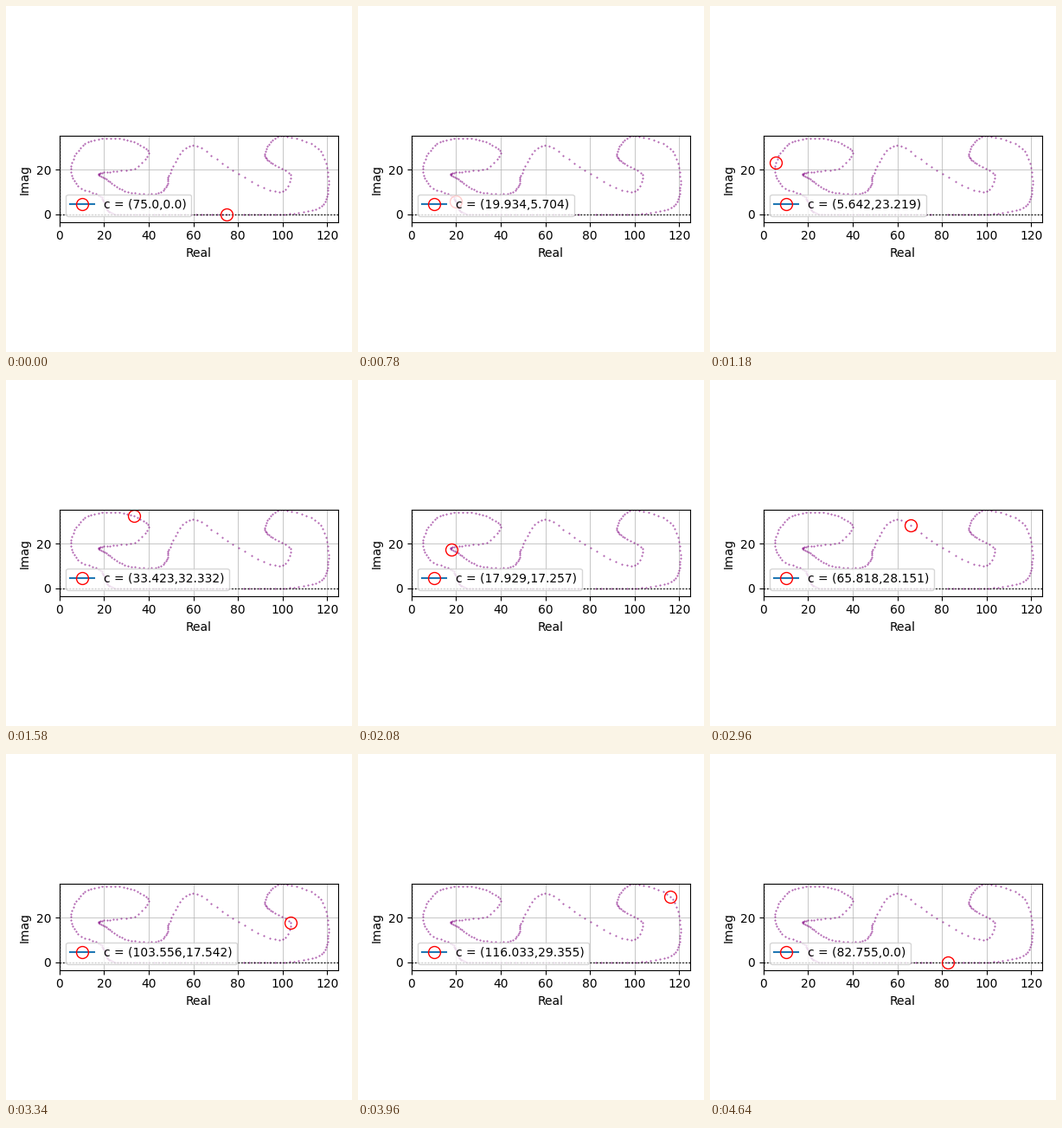
A matplotlib script that plays this animation: 400 px wide and 400 px high, repeating every 4.66 s.

```python
import numpy as np
import matplotlib.pyplot as plt
from matplotlib.animation import FuncAnimation

SIZE = 400
STEPS = 233

# Key points of the curve in the complex plane, by time step
KEYS = {
    0: 75, 24: 25, 39: 19.934 + 5.704j, 45: 17.7 + 8.5j,
    51: 8.4 + 12.6j, 54: 5.8 + 16.2j, 66: 11.5 + 31.6j,
    79: 33.423 + 32.332j, 85: 39.9 + 27.3j, 90: 33.7 + 20.5j,
    95: 24 + 19.2j, 102: 17.5 + 17.9j, 108: 20.9 + 15.6j,
    117: 30.6 + 10j, 126: 45.6 + 9.9j, 130: 48.194 + 13.167j,
    135: 49 + 17.4j, 146: 61.7 + 30.5j, 152: 75.2 + 21.1j,
    162: 100 + 10.3j, 167: 103.556 + 17.542j, 172: 96.7 + 22j,
    178: 92.2 + 25.5j, 190: 100.6 + 35j, 198: 116.033 + 29.355j,
    208: 120.4 + 11.9j, 216: 116.3 + 2.95j, 222: 105.2 + 0.3j,
    232: 82.755,
}


def spline(t, keys):
    """Cubic Hermite curve through the keys, slopes from their neighbours."""
    knots = np.array(list(keys), float)
    c = np.array(list(keys.values()), complex)
    i = np.clip(np.searchsorted(knots, t, side="right") - 1, 0, len(c) - 2)
    h = np.diff(knots)[i]
    u = (t - knots[i]) / h
    slope = np.gradient(c.real, knots) + 1j * np.gradient(c.imag, knots)
    return ((1 + 2 * u) * (1 - u) ** 2 * c[i]
            + u * (1 - u) ** 2 * h * slope[i]
            + u ** 2 * (3 - 2 * u) * c[i + 1]
            + u ** 2 * (u - 1) * h * slope[i + 1])


curve = spline(np.arange(STEPS), KEYS)
real = curve.real
imag = np.maximum(curve.imag, 0)


def label(i):
    return f"c = ({round(float(real[i]), 3)},{round(float(imag[i]), 3)})"


fig = plt.figure(figsize=(4, 4), dpi=100)
ax = fig.add_axes([61.8 / SIZE, 0, 322.4 / SIZE, 1])
ax.set_aspect("equal")
ax.set_xlim(0, 125)
ax.set_ylim(-3.5, 35)
ax.set_xticks(range(0, 121, 20))
ax.set_yticks([0, 20])
ax.set_xlabel("Real")
ax.set_ylabel("Imag")
ax.grid(True, lw=0.5)

ax.plot(real, imag, ".", color="purple", ms=1, alpha=0.7)
ax.axhline(0, color="black", ls=":", lw=1)
ax.axvline(0, color="black", ls=":", lw=1)
point, = ax.plot([real[0]], [imag[0]], "o-", color="C0", ms=10,
                 mfc="none", mec="red", label=label(0))
legend_text = ax.legend(loc="lower left").get_texts()[0]


def update(i):
    point.set_data([real[i]], [imag[i]])
    legend_text.set_text(label(i))
    return point, legend_text


anim = FuncAnimation(fig, update, frames=STEPS, interval=20, repeat=True)
plt.show()
```
